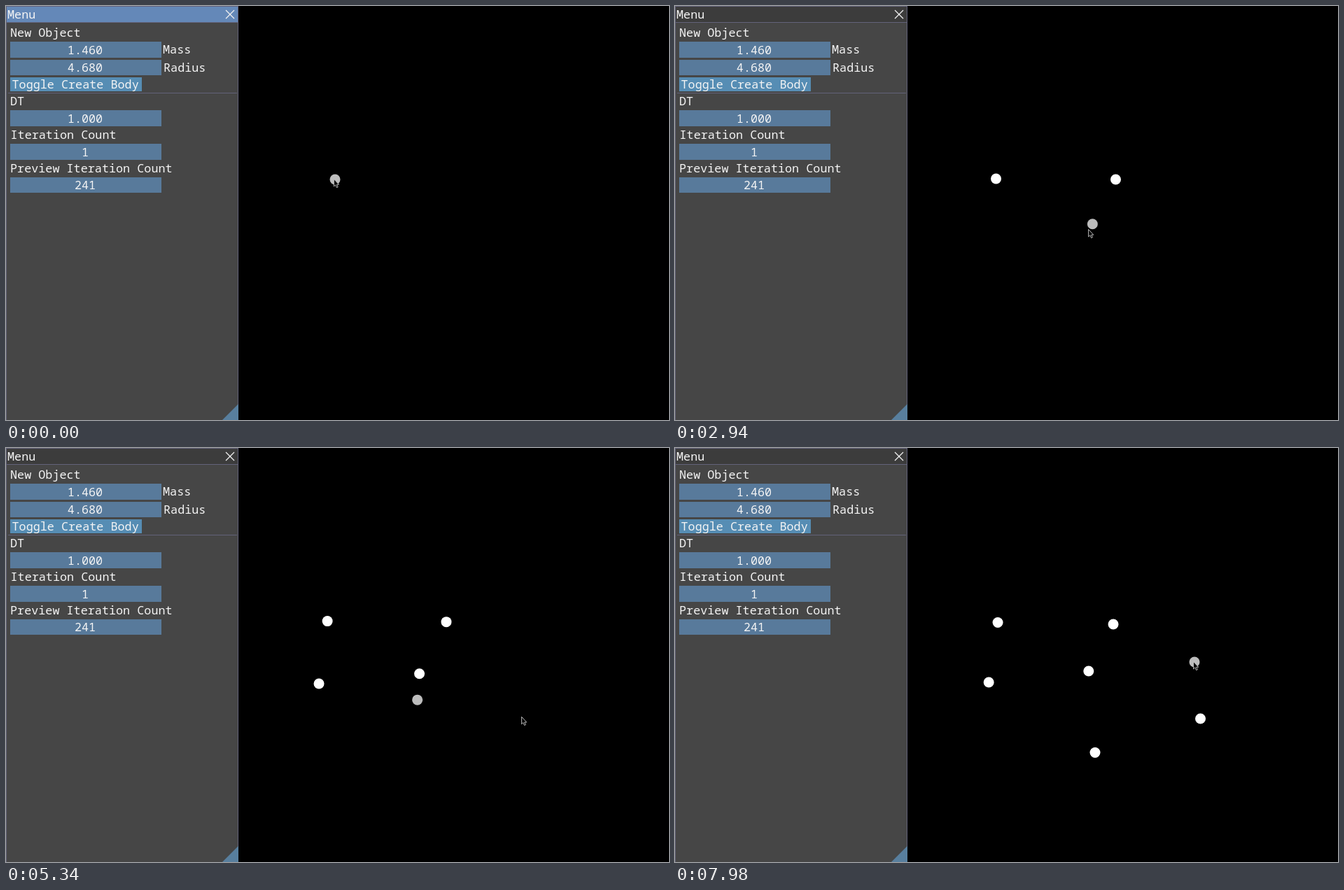
An HTML page with a canvas that plays this animation: 947x592 px, repeating every 8000 ms.

```html
<!DOCTYPE html>
<html lang="en">
<head>
<meta charset="utf-8">
<title>Body sandbox</title>
<style>
  html, body { margin: 0; width: 100%; height: 100%; overflow: hidden; background: #000; }
  canvas { display: block; }
</style>
</head>
<body>
<canvas id="stage" width="947" height="592"></canvas>
<script>
const LOOP = 8000, RADIUS = 7.5, CURSOR_LEAD = 80, FOCUS_LOST = 1120;
const PANEL_W = 332, PANEL_H = 592;
const EDGE = '#62627a', FIELD = '#587a9b', BUTTON = '#568db4', TITLE = '#6488b8';
const ctx = document.getElementById('stage').getContext('2d');

// Pointer moves: start, end, destination
const start = { x: 470, y: 248 };
const moves = [
  [20, 900, 458.5, 247],
  [1150, 1800, 629.5, 248],
  [2450, 3100, 590.5, 323],
  [3995, 4220, 447, 337],
  [5246, 5446, 751, 387],
  [6150, 6650, 600, 435.5],
  [7200, 7700, 742, 306]
];

// Placed bodies: time, position, drift reached at the end of the loop
const bodies = [
  [1140, 458.5, 247, 2.6, 2.5],
  [2080, 629.5, 248, -3.5, 4],
  [3500, 590.5, 323, 0.3, -4],
  [4400, 447, 337, 1.2, -2],
  [6000, 751, 387, -0.5, 0],
  [7000, 600, 435.5, 0, 0]
];

function pointer(t) {
  let { x, y } = start;
  for (const [from, to, nx, ny] of moves) {
    const u = Math.min(1, Math.max(0, (t - from) / (to - from)));
    const k = u * u * (3 - 2 * u);
    x += (nx - x) * k;
    y += (ny - y) * k;
  }
  return { x, y };
}

function box(x, y, w, h, fill) {
  ctx.fillStyle = fill;
  ctx.fillRect(x, y, w, h);
}

function line(color, ...pts) {
  ctx.strokeStyle = color;
  ctx.beginPath();
  for (let i = 0; i < pts.length; i += 2) ctx.lineTo(pts[i], pts[i + 1]);
  ctx.stroke();
}

function label(text, x, y, align = 'left') {
  ctx.font = '16.8px "Noto Sans Mono", "DejaVu Sans Mono", monospace';
  ctx.fillStyle = '#f4f4f4';
  ctx.textAlign = align;
  ctx.fillText(text, x, y + 6);
}

function field(y, h, value) {
  box(6, y, 216, h, FIELD);
  label(value, 113, y + h / 2, 'center');
}

function drawPanel(focused) {
  box(0, 0, PANEL_W, PANEL_H, '#464646');
  box(0, 0, PANEL_W, 23, focused ? TITLE : '#3c3c3c');
  ctx.lineWidth = 1;
  line(EDGE, 0, 23.5, PANEL_W, 23.5);
  line(EDGE, 3, 124.5, 330, 124.5);
  ctx.strokeRect(0.5, 0.5, PANEL_W - 1, PANEL_H);

  label('Menu', 2, 12);
  ctx.lineWidth = 1.3;
  line('#f0f0f0', 314, 6, 326, 18);
  line('#f0f0f0', 326, 6, 314, 18);

  label('New Object', 6, 38);
  field(51, 23, '1.460');
  label('Mass', 224, 62);
  field(77, 22, '4.680');
  label('Radius', 225, 88);
  box(6, 102, 188, 20, BUTTON);
  label('Toggle Create Body', 8.5, 112);
  label('DT', 6, 136);
  field(149, 23, '1.000');
  label('Iteration Count', 6.5, 184);
  field(197, 23, '1');
  label('Preview Iteration Count', 6, 232);
  field(245, 22, '241');

  ctx.fillStyle = '#587f9e';
  ctx.beginPath();
  ctx.moveTo(309, 592);
  ctx.lineTo(332, 569);
  ctx.lineTo(332, 592);
  ctx.fill();
}

function disc(x, y, fill) {
  ctx.fillStyle = fill;
  ctx.beginPath();
  ctx.arc(x, y, RADIUS, 0, 2 * Math.PI);
  ctx.fill();
}

const arrow = new Path2D('M0 0V10.5L2.3 8.4L4 12.2L5.8 11.4L4.2 7.8H7.2Z');

function drawCursor({ x, y }) {
  ctx.save();
  ctx.translate(x - 1.5, y - 0.5);
  ctx.fillStyle = '#080808';
  ctx.strokeStyle = '#c8c8c8';
  ctx.lineWidth = 0.9;
  ctx.fill(arrow);
  ctx.stroke(arrow);
  ctx.restore();
}

function draw(t) {
  box(0, 0, 947, 592, '#000');
  drawPanel(t < FOCUS_LOST);
  for (const [born, x, y, dx, dy] of bodies) {
    if (t < born) continue;
    const k = ((t - born) / (LOOP - born)) ** 3;
    disc(x + dx * k, y + dy * k, '#fff');
  }
  const ghost = pointer(t);
  disc(ghost.x, ghost.y, 'rgba(255,255,255,0.74)');
  drawCursor(pointer(t + CURSOR_LEAD));
}

const origin = performance.now();
function tick() {
  draw((performance.now() - origin) % LOOP);
  requestAnimationFrame(tick);
}
tick();
</script>
</body>
</html>
```
